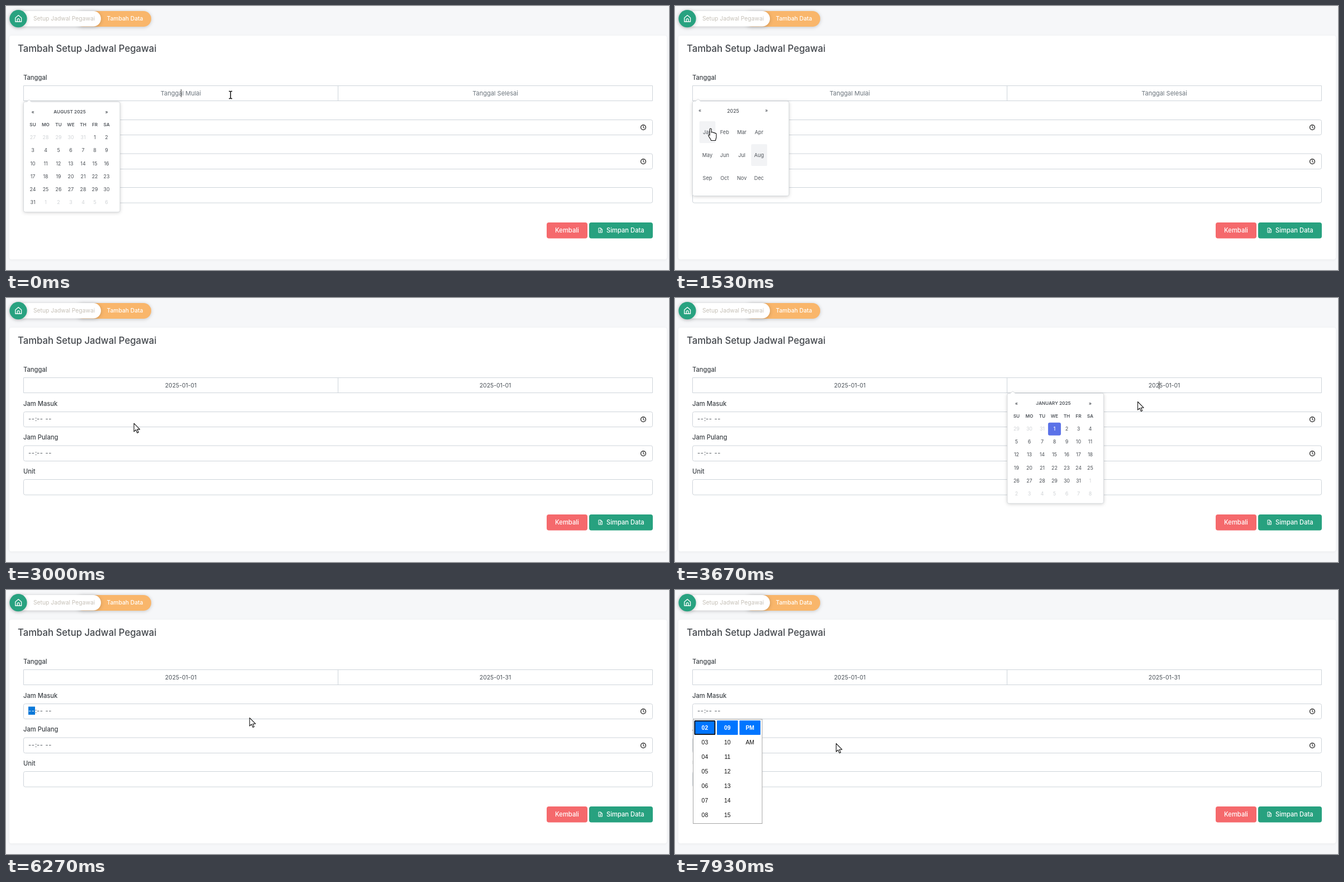
Recreate the animation shown at these times as an HTML page. Size 1187 by 472 pixels, loop 8 s.

```html
<!DOCTYPE html>
<html lang="id">
<head>
<meta charset="utf-8">
<title>Tambah Setup Jadwal Pegawai</title>
<style>
html, body { margin: 0; width: 100%; height: 100%; overflow: hidden; background: #f6f7f9; }
svg { display: block; font-family: Inter, "Open Sans", sans-serif; }
.field { fill: #fff; stroke: #ced4da; }
.soft { filter: drop-shadow(0 1px 3px #0003); }
.card { filter: drop-shadow(0 1px 2px #0000000d); }
</style>
</head>
<body>
<svg id="stage" width="1187" height="472" viewBox="0 0 1187 472">
  <rect width="1187" height="472" fill="#f6f7f9"/>
  <rect class="card" x="6" y="53" width="1177" height="400" rx="4" fill="#fff"/>
  <rect class="soft" x="124" y="9" width="136" height="28" rx="14" fill="#f9b66b"/>
  <rect class="soft" x="8" y="9" width="162" height="27.5" rx="13.75" fill="#fff"/>
  <circle class="soft" cx="22" cy="22.7" r="15.6" fill="#28a280"/>
  <path d="M16.8 21.2L22.2 16.6L27.6 21.2V28H16.8ZM20.3 28V24.6a1.9 1.9 0 0 1 3.8 0V28" fill="none" stroke="#fff" stroke-width="1.3" stroke-linejoin="round"/>
  <rect x="968" y="387" width="73" height="28.5" rx="4" fill="#f5696c"/>
  <rect x="1044" y="387" width="114" height="28.5" rx="4" fill="#27a17f"/>
  <path d="M1061 397h4l2.4 2.4v5.6h-6.4zM1064.7 397v2.7h2.7M1062.7 401.4h3M1062.7 403.2h3" fill="none" stroke="#fff"/>
  <path class="field" d="M31.5 142.5H1157.5V169.5H31.5ZM594.5 142.5V169.5"/>
  <rect class="field" x="31.5" y="203.5" width="1126" height="27" rx="3"/>
  <rect class="field" x="31.5" y="264" width="1126" height="27.5" rx="3"/>
  <rect class="field" x="31.5" y="324.5" width="1126" height="27.5" rx="3"/>
</svg>
<script>
const LOOP = 8000, STEP = 1000 / 15;
const FOCUS1 = -130, MONTHS = 1000, JANUARY = 1800, PICK1 = 2870, FOCUS2 = 3470,
      PICK2 = 5270, TIME_ON = 5870, TIME_OFF = 7270, POPUP = 7530;
const stage = document.getElementById('stage');

function add(parent, tag, attrs = {}, text) {
  const node = document.createElementNS('http://www.w3.org/2000/svg', tag);
  for (const k in attrs) node.setAttribute(k, attrs[k]);
  if (text !== undefined) node.textContent = text;
  return parent.appendChild(node);
}
const group = parent => add(parent, 'g');
const show = (node, on) => { node.style.display = on ? '' : 'none'; };
const put = (node, x, y) => node.setAttribute('transform', `translate(${x} ${y})`);

// y is the middle of the capitals
function label(parent, text, x, y, size, fill, weight = 400, anchor = 'middle', more = {}) {
  return add(parent, 'text', { x, y: y + size * .364, 'font-size': size, fill,
    'font-weight': weight, 'text-anchor': anchor, ...more }, text);
}
const left = (text, x, y, size, fill, weight) => label(stage, text, x, y, size, fill, weight, 'start');

left('Setup Jadwal Pegawai', 49, 22.7, 10.3, '#c6c1b8');
left('Tambah Data', 180.5, 22.7, 10.3, '#fff', 500);
left('Tambah Setup Jadwal Pegawai', 21, 76, 16.7, '#44484d', 500);
['Tanggal', 'Jam Masuk', 'Jam Pulang', 'Unit'].forEach((s, i) =>
  left(s, 31, 128 + i * 60.7, 11.2, '#3f4449', 500));
label(stage, 'Kembali', 1004.5, 401, 11.2, '#fff', 500);
left('Simpan Data', 1075, 401, 11.2, '#fff', 500);

const startText = label(stage, '', 313, 155.5, 11, '#6c757d');
const endText = label(stage, '', 876, 155.5, 11, '#6c757d');
const caret = add(stage, 'rect', { y: 149, width: 1, height: 14, fill: '#333' });

const selection = add(stage, 'rect', { x: 40, y: 208.5, width: 12, height: 14.5, fill: '#0a78d8' });
const hours = [216, 277].map(y => {
  const [hh] = [['--', 40], [':', 52], ['--', 55], ['--', 70.5]].map(([s, x]) =>
    label(stage, s, x, y, 11.2, '#495057', 400, 'start', { 'letter-spacing': .5 }));
  add(stage, 'circle', { cx: 1141, cy: y + 1, r: 4.4, fill: 'none', stroke: '#111', 'stroke-width': 1.2 });
  add(stage, 'path', { d: `M1141 ${y - 2}v3.2l2 1.3`, fill: 'none', stroke: '#111' });
  return hh;
});

const COLS = [17, 40, 63, 85, 107, 128, 149];
const ROW = 23.1, GRID_TOP = 222.4;

function panel(height) {
  const root = group(stage);
  add(root, 'rect', { class: 'soft', x: .5, y: 170, width: 172.5, height, rx: 3, fill: '#fff' });
  add(root, 'path', { d: `M6 170L10.3 166.5L14.6 170H170a3 3 0 0 1 3 3v${height - 6}a3 3 0 0 1 -3 3H3.5a3 3 0 0 1 -3 -3V173a3 3 0 0 1 3 -3Z`,
    fill: '#fff', stroke: '#d3d6da', 'stroke-width': .9 });
  const hover = add(root, 'rect', { fill: '#f2f3f5', rx: 2 });
  return { root, hover };
}

function dayView(title, first, before, length, chosen) {
  const view = panel(197);
  const { root } = view;
  const bold = (s, x, y) => label(root, s, x, y, 8.2, '#50555b', 600);
  bold('«', 17, 187.3);
  bold(title, 83, 187.5);
  bold('»', 149, 187.3);
  ['SU', 'MO', 'TU', 'WE', 'TH', 'FR', 'SA'].forEach((s, i) => bold(s, COLS[i], 210.5));
  for (let i = 0; i < 42; i++) {
    const n = i - first + 1, inside = n > 0 && n <= length;
    const day = n < 1 ? before + n : inside ? n : n - length;
    const x = COLS[i % 7], y = 233.8 + Math.floor(i / 7) * ROW;
    const picked = n === chosen;
    if (picked) add(root, 'rect', { x: x - 11.5, y: y - 11.3, width: 23, height: 23, rx: 3, fill: '#5b72e8' });
    label(root, day, x, y, 8.8, picked ? '#fff' : inside ? '#4b5056' : '#d0d3d6', picked ? 500 : 400);
  }
  view.cell = (x, y) => {
    if (x > 29 && x < 137 && y > 177 && y < 199) return [29, 176.5, 108, 22];
    const r = Math.floor((y - GRID_TOP) / ROW);
    const c = COLS.findIndex(m => Math.abs(x - m) < 11.2);
    return r >= 0 && r < 6 && c >= 0 ? [COLS[c] - 10.5, GRID_TOP + r * ROW, 21, 22.5] : null;
  };
  return view;
}

function monthView() {
  const view = panel(169.5);
  const { root } = view;
  label(root, '«', 13.5, 187.3, 8.4, '#50555b', 500);
  label(root, '2025', 73, 187.5, 8.6, '#50555b', 500);
  label(root, '»', 132.7, 187.3, 8.4, '#50555b', 500);
  add(root, 'rect', { x: 105.3, y: 247, width: 28.7, height: 39, rx: 2, fill: '#f2f3f5' });
  'Jan Feb Mar Apr May Jun Jul Aug Sep Oct Nov Dec'.split(' ').forEach((s, i) =>
    label(root, s, 27 + i % 4 * 30.8, 225.3 + Math.floor(i / 4) * 41.4, 9.2, '#50555b'));
  view.cell = (x, y) => {
    const c = Math.floor((x - 11.5) / 30.8), r = Math.floor((y - 204.5) / 41.4);
    return c >= 0 && c < 4 && r >= 0 && r < 3 ? [12.7 + c * 30.8, 206 + r * 41.4, 28.7, 39] : null;
  };
  return view;
}

const views = [
  { ...dayView('AUGUST 2025', 5, 31, 31), from: FOCUS1, to: MONTHS, x: 31 },
  { ...monthView(), from: MONTHS, to: JANUARY, x: 31 },
  { ...dayView('JANUARY 2025', 3, 31, 31), from: JANUARY, to: PICK1, x: 31 },
  { ...dayView('JANUARY 2025', 3, 31, 31, 1), from: FOCUS2, to: PICK2, x: 594.4 },
];

const popup = group(stage);
add(popup, 'rect', { x: 32.5, y: 231, width: 123.5, height: 186.5, fill: '#fff', stroke: '#a5a5a5' });
const two = n => String(n).padStart(2, '0');
[i => two(i + 2), i => two(i + 9), i => ['PM', 'AM'][i]].forEach((name, c) => {
  const x = 53.4 + c * 40.4;
  add(popup, 'rect', { x: x - 18.8, y: 233.3, width: 37.6, height: 25.7, rx: 1, fill: '#0075ff' });
  if (!c) add(popup, 'rect', { x: x - 18, y: 234.2, width: 36, height: 24, rx: 1, fill: 'none', stroke: '#101010', 'stroke-width': 1.8 });
  for (let i = 0; i < 7 && name(i); i++)
    label(popup, name(i), x, 246 + i * 26, 10.4, i ? '#111' : '#fff', i ? 400 : 700, 'middle',
      { 'font-family': 'Liberation Sans, Arial, sans-serif' });
});

const pointer = group(stage);
const shapes = {
  arrow: 'M.5 .5V15.2L3.9 12L6.4 17.6L8.7 16.6L6.3 11.2H11Z',
  hand: 'M-1.8 1.4C-1.8 -.5 1.2 -.5 1.2 1.4V7.2C1.6 6 4.2 6.3 4.4 7.8C5.1 6.9 7.3 7.3 7.4 8.7C8.4 8 10 8.6 10 10.2V15.2C10 17.2 8.8 18.4 8.6 21.5H.6C.4 18.7 -2.8 16.2 -4.2 12.8C-4.6 11.2 -2.8 10.6 -1.8 12.2Z',
  beam: 'M-3 -6.5H-1L0 -5.8L1 -6.5H3M0 -5.8V5.8M-3 6.5H-1L0 5.8L1 6.5H3',
};
const cursors = {};
for (const k in shapes) cursors[k] = add(pointer, 'path', { d: shapes[k],
  fill: k === 'beam' ? 'none' : '#fff', stroke: '#111', 'stroke-width': k === 'beam' ? 1.5 : 1.1, 'stroke-linejoin': 'round' });
add(cursors.hand.parentNode, 'path', { d: '', fill: 'none' });

// time, x, y, 1 = eased arrival
const path = [
  [0, 402, 159], [60, 402, 159], [740, 116, 188, 1], [1000, 116, 188], [1470, 64, 219, 1],
  [1800, 64, 219], [2130, 55, 222, 1], [2530, 102, 236, 1], [2730, 113, 236], [2870, 113, 236],
  [3400, 838, 159, 1], [3470, 838, 159], [3670, 828, 185], [4530, 716, 252, 1], [4930, 723, 322],
  [5270, 723, 322], [5850, 300, 214, 1], [6070, 283, 217], [6270, 435, 228], [6600, 760, 238],
  [7000, 1094, 225], [7270, 1136, 219], [7500, 1136, 219], [7930, 288, 274, 1], [LOOP, 288, 274],
];
function pointerAt(t) {
  const i = Math.max(1, path.findIndex(p => p[0] >= t));
  const a = path[i - 1], b = path[i];
  let p = (t - a[0]) / (b[0] - a[0]);
  if (b[3]) p = p * p * (3 - 2 * p);
  return [a[1] + (b[1] - a[1]) * p, a[2] + (b[2] - a[2]) * p];
}

function setField(node, value, hint) {
  node.textContent = value || hint;
  node.setAttribute('fill', value ? '#495057' : '#6c757d');
  node.setAttribute('font-size', value ? 10.4 : 11);
}

function render(time) {
  const t = Math.floor((time + 4) / STEP) * STEP + 4;
  const [x, y] = pointerAt(t);
  let kind = y > 142 && y < 169 && x > 31 && x < 1158 ? 'beam' : 'arrow';

  for (const v of views) {
    const open = t >= v.from && t < v.to;
    show(v.root, open);
    if (!open) continue;
    const rest = Math.max(0, 1 - (t - v.from) / 300);
    put(v.root, v.x, 8 * rest ** 3);
    const cell = v.cell(x - v.x, y);
    show(v.hover, cell);
    if (cell) {
      kind = 'hand';
      ['x', 'y', 'width', 'height'].forEach((k, i) => v.hover.setAttribute(k, cell[i]));
    }
  }

  setField(startText, t >= PICK1 && '2025-01-01', 'Tanggal Mulai');
  setField(endText, t >= PICK1 && (t < PICK2 ? '2025-01-01' : '2025-01-31'), 'Tanggal Selesai');

  const second = t >= FOCUS2;
  const focused = second ? t < PICK2 : t < PICK1;
  caret.setAttribute('x', second ? 866.3 : 313);
  show(caret, focused && Math.floor((t - (second ? FOCUS2 : FOCUS1)) / 530) % 2 === 0);

  const active = t >= TIME_ON && t < TIME_OFF;
  show(selection, active);
  hours[0].setAttribute('fill', active ? '#fff' : '#495057');
  show(popup, t >= POPUP);

  for (const k in cursors) show(cursors[k], k === kind);
  put(pointer, x, y);
}

const began = performance.now();
function tick() {
  render((performance.now() - began) % LOOP);
  requestAnimationFrame(tick);
}
tick();
</script>
</body>
</html>
```
